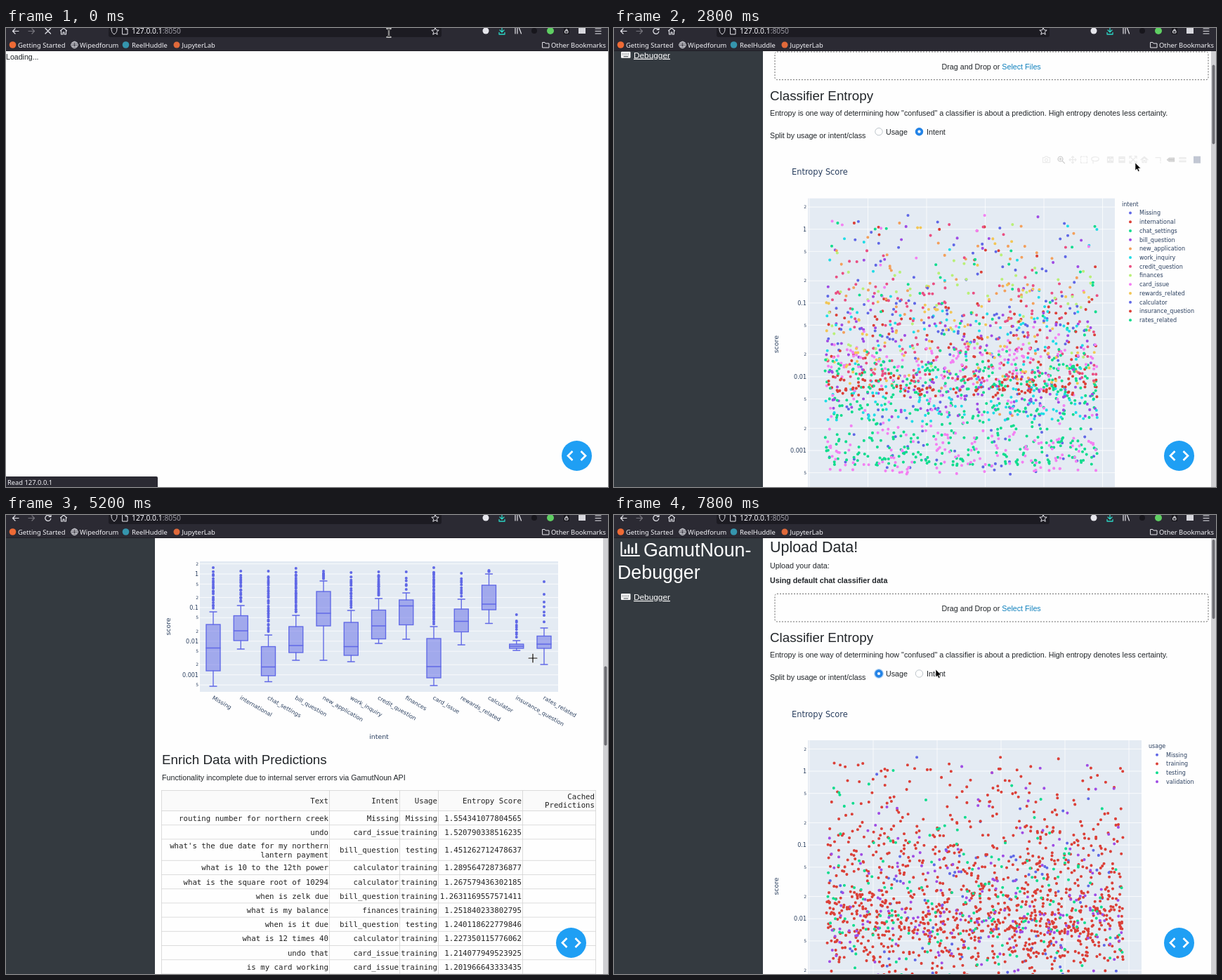
These frames come from a looping animation (857 px wide and 654 px high, 8 s). An HTML page:

```html
<!DOCTYPE html>
<html lang="en">
<head>
<meta charset="utf-8">
<title>Entropy dashboard</title>
<style>
html, body { margin: 0; width: 100%; height: 100%; overflow: hidden; background: #fefefe; }
svg { display: block; width: 857px; height: 654px; }
text { white-space: pre; }
.a { font-family: "Liberation Sans", Arial, sans-serif; fill: #212529; }
.d { font-family: "DejaVu Sans", Verdana, sans-serif; fill: #2a3f5f; }
.m { font-family: "DejaVu Sans Mono", monospace; fill: #222; }
.n { font-family: "Noto Sans", sans-serif; fill: #f4f4f8; }
.line { fill: none; stroke-linecap: round; stroke-linejoin: round; }
</style>
</head>
<body>
<svg id="stage" viewBox="0 0 857 654"></svg>
<script>
const LOOP = 8000, BODY = 10.73, TICK = 8.05;

// name, points, box outliers, then box heights: top outlier, whisker, q3, median, q1, whisker
const classes = [
  ["Missing", 115, 20, 175, 238, 256, 289.5, 322, 344],
  ["international", 110, 16, 180, 229, 243.5, 265, 279, 291],
  ["chat_settings", 400, 30, 180, 271, 287.5, 316.5, 329, 337.5],
  ["bill_question", 180, 24, 176, 243, 259, 286, 296, 307],
  ["new_application", 65, 7, 180, 194, 209, 240, 258, 307],
  ["work_inquiry", 170, 16, 182, 236, 253, 287.5, 300, 309],
  ["credit_question", 190, 17, 181, 219, 235.5, 258, 276.5, 283],
  ["finances", 60, 6, 181, 211, 221, 229.5, 256.5, 277],
  ["card_issue", 290, 32, 175, 259, 276, 316, 332, 343],
  ["rewards_related", 85, 10, 183, 220, 234, 251.5, 266.5, 285],
  ["calculator", 45, 3, 179, 184, 200, 227, 235, 254.5],
  ["insurance_question", 115, 9, 242, 279, 284, 287, 290, 293],
  ["rates_related", 90, 7, 195, 261, 272.5, 284, 290, 313]
];
const palette = ["#6068e6", "#db4038", "#10dc8e", "#9f4ce4", "#f3a05c",
  "#20dce6", "#ea4f82", "#b9f078", "#f380f2", "#f2c656"];
const usages = ["Missing", "training", "testing", "validation"];

let seed = 71;
const rnd = () => (seed = (seed * 48271) % 2147483647) / 2147483647;

const text = (x, y, s, size = BODY, cls = "a", extra = "") =>
  `<text x="${x}" y="${y}" font-size="${size}" class="${cls}" ${extra}>${s}</text>`;
const rect = (x, y, w, h, fill, extra = "") =>
  `<rect x="${x}" y="${y}" width="${w}" height="${h}" fill="${fill}" ${extra}/>`;
const dot = (x, y, r, fill, extra = "") =>
  `<circle cx="${x}" cy="${y}" r="${r}" fill="${fill}" ${extra}/>`;
const line = (d, color, w = 1, extra = "") =>
  `<path class="line" d="${d}" stroke="${color}" stroke-width="${w}" ${extra}/>`;
const group = (id, body) => `<g id="${id}">${body}</g>`;
const mid = 'text-anchor="middle"', end = 'text-anchor="end"';

function logAxis(one, decade, x, y, w, h) {
  let s = rect(x, y, w, h, "#e4ebf3");
  for (let e = 0; e < 5; e++) for (const m of [1, 2, 5]) {
    const ty = one + decade * (e - Math.log10(m));
    if (ty < y || ty > y + h) continue;
    const size = m === 1 ? TICK : 6;
    s += line(`M${x} ${ty}h${w}`, "#fff", 0.75) +
      text(274, ty + size * 0.36, m === 1 ? [1, 0.1, 0.01, 0.001][e] : m, size, "d", end);
  }
  return s;
}

const turned = (y) => text(0, 0, "score", 9.39, "d", `${mid} transform="translate(234 ${y}) rotate(-90)"`);

// Every point follows the quartiles of its class.
const points = classes.flatMap(([, n, , top, ...q], kind) => Array.from({ length: n }, (_, i) => {
  const u = rnd() * 4, k = Math.floor(u);
  const tail = rnd() < 0.08;
  const y = i === 0 ? top : tail ? q[0] - (q[0] - top) * rnd() : q[k] + (q[k + 1] - q[k]) * (u - k);
  const r = rnd();
  const use = kind === 0 ? 0 : r < 0.74 ? 1 : r < 0.87 ? 2 : 3;
  return { x: rnd(), y: 365 + (y - 184) * 2.194, kind, use };
}));

function scatter(id, names, key, width, step) {
  let s = logAxis(365, 105.1, 276, 321, width, 416);
  for (let i = 0; i < 6; i++) {
    const x = 278 + i * step;
    s += line(`M${x} 321v416`, "#fff", 0.75) + text(x, 746, 601 + i / 2 + "k", TICK, "d", mid);
  }
  const left = 276 + width;
  s += text(276 + width / 2, 765, "id", 9.39, "d", mid) + text(left + 10, 332, key, TICK, "d");
  names.forEach((name, i) => {
    const color = palette[i % 10], y = 341.8 + i * 12.72;
    const d = points.filter(p => (key === "usage" ? p.use : p.kind) === i)
      .map(p => `M${(278 + (0.27 + p.x * 4.64) * step).toFixed(1)} ${p.y.toFixed(1)}h.01`).join("");
    s += line(d, color, 4.1) + dot(left + 22, y, 2, color) + text(left + 35, y + 2.9, name, TICK, "d");
  });
  return group(id, s);
}

function boxPlot() {
  const c = palette[0];
  let s = logAxis(184, 47.9, 276, 166, 510, 186);
  classes.forEach(([name, , n, top, high, q3, med, q1, low], i) => {
    const x = 295 + i * 39.25;
    s += line(`M${x} ${high}V${q3}M${x} ${q1}V${low}M${x - 5} ${high}h10M${x - 5} ${low}h10`, c, 1.35) +
      rect(x - 10, q3, 20, q1 - q3, c, `fill-opacity=".5" stroke="${c}" stroke-width="1.35"`) +
      line(`M${x - 10} ${med}h20`, c, 1.35);
    for (let k = 0; k < n; k++) {
      const f = k ? Math.min(1, (k + 1 + rnd() * 0.8) / (n + 1)) : 0;
      s += dot(x, top + (high - 3 - top) * f, 2, c);
    }
    s += text(0, 0, name, TICK, "d", `transform="translate(${x - 2} 362) rotate(30)"`);
  });
  return s + turned(259) + text(531, 419, "intent", 9.39, "d", mid);
}

function table() {
  const cols = [221.5, 460.5, 560.5, 615.5, 735.5, 839.5];
  const rows = [
    ["routing number for northern creek", "Missing", "Missing", "1.554341077804565"],
    ["undo", "card_issue", "training", "1.520790338516235"],
    ["what's the due date for my northern|lantern payment", "bill_question", "testing", "1.451262712478637"],
    ["what is 10 to the 12th power", "calculator", "training", "1.289564728736877"],
    ["what is the square root of 10294", "calculator", "training", "1.267579436302185"],
    ["when is zelk due", "bill_question", "training", "1.2631169557571411"],
    ["what is my balance", "finances", "training", "1.251840233802795"],
    ["when is it due", "bill_question", "testing", "1.240118622779846"],
    ["what is 12 times 40", "calculator", "training", "1.227350115776062"],
    ["undo that", "card_issue", "training", "1.214077949523925"],
    ["is my card working", "card_issue", "training", "1.201966643333435"]
  ];
  let y = 492.5, lines = "", s = rect(221.5, y, 618, 29, "#fafafa");
  const addRow = (cells, h) => {
    cells.forEach((cell, i) => cell.split("|").forEach((part, k, all) => {
      s += text(cols[i + 1] - 1.5, y + h / 2 + 4 + (k - (all.length - 1) / 2) * 12.9, part, BODY, "m", end);
    }));
    lines += `M221.5 ${y}h618`;
    y += h;
  };
  addRow(["Text", "Intent", "Usage", "Entropy Score", "Cached|Predictions"], 29);
  rows.forEach(r => addRow(r, r[0].includes("|") ? 30.4 : 20.2));
  cols.forEach(x => lines += `M${x} 492.5V${y}`);
  return s + line(lines + `M221.5 ${y}h618`, "#d3d3d3", 0.8);
}

const glyphs = {
  camera: "M-5-3h2.5l1-1.5h3l1 1.5h2.5v7h-10zM0-1.5a2 2 0 1 0 .01 0z",
  zoom: "M-1-4.5a3.5 3.5 0 1 0 .01 0zM2 2l3 3M-2.5-1h3M-1-2.5v3",
  pan: "M-5 0h10M0-5v10M-1.5-3.5l1.5-1.5 1.5 1.5M-1.5 3.5l1.5 1.5 1.5-1.5M-3.5-1.5l-1.5 1.5 1.5 1.5M3.5-1.5l1.5 1.5-1.5 1.5",
  select: "M-4.5-4.5h2m2 0h1m2 0h2v2m0 2v1m0 2v2h-2m-2 0h-1m-2 0h-2v-2m0-2v-1m0-2v-2",
  lasso: "M0-4c7 0 7 6 0 6s-7-6 0-6M-3 1c-1 2 1 2 0 4",
  plus: "M-4-4h8v8h-8zM-3-2h6M-3 2h6M-3-3h2v6h-2M3-3h-2v6h2",
  minus: "M-4-4h8v8h-8zM-3-2.5h6M-3 2.5h6M-3-1.7h6M-3 1.7h6",
  auto: "M-4-4l8 8M-4 4l8-8M-5-2v-3h3M2-5h3v3M5 2v3h-3M-2 5h-3v-3",
  home: "M-5 0l5-4.5 5 4.5M-3 0v4h2v-3h2v3h2v-4l-3-3z",
  spike: "M-4-3h6M3-3v5M3 4v.5",
  near: "M-5 0l3-2.5h7v5h-7zM-3 0h7M-2-1h6M-2 1h6",
  compare: "M-4-3h9v1.5h-9zM-4 1.5h9v1.5h-9z"
};

function modebar(id, y, isBox) {
  const names = Object.keys(glyphs).filter(n => !isBox || (n !== "select" && n !== "lasso"));
  const xs = isBox ? [647.5, 669, 685] : [615.5, 636.5, 653, 669, 685];
  xs.push(706.5, 723, 739, 755, 775, 792.5, 809);
  const icons = names.map((n, i) => line(glyphs[n], n === "zoom" || n === "near" ? "#777" : "#c8c8c8", 1.3,
    `transform="translate(${xs[i]} ${y})"`));
  return group(id, icons.join("") + rect(825, y - 5, 10, 10, "#4c5c80"));
}

function radio(id, x) {
  return dot(x, 226, 5.2, "#fff", 'stroke="#adb5bd" stroke-width=".8"') +
    group(id, dot(x, 226, 5.7, "#2384e8") + dot(x, 226, 2.1, "#fff"));
}

function toolbar() {
  const w = "#e6e6ec";
  return rect(0, 0, 857, 33, "#2b2a33") + rect(0, 32, 857, 1, "#201f27") +
    rect(146, -10, 474, 23, "#1c1b22", 'rx="3"') +
    line("M18 4.5h-8M13 1l-3.5 3.5 3.5 3.5", w, 1.2) +
    line("M32 4.5h8M37 1l3.5 3.5-3.5 3.5", "#77767e", 1.2) +
    group("stop", line("M56 .5l7.5 7.5M63.5 .5l-7.5 7.5", w, 1.2)) +
    group("reload", line("M63 2a4 4 0 1 0 .8 3M64-.5v3h-3", w, 1.2)) +
    line("M77.5 4l4.5-4 4.5 4M78.5 4v5h2.5v-3h2v3h2.5v-5", w, 1.1) +
    line("M150 0c2 0 3-1 4-1s2 1 4 1c0 5-1 7-4 9-3-2-4-4-4-9z", w) +
    line("M166-1h4l3 3v7h-7zM170-1v3h3", w) +
    text(179, 8, '127.0.0.1<tspan fill="#9b9aa3">:8050</tspan>', 10.3, "n") +
    line("M611-.5l1.5 3.4 3.7.3-2.9 2.4.9 3.7-3.2-2-3.2 2 .9-3.7-2.9-2.4 3.7-.3z", w) +
    dot(683, 4, 4.5, w) +
    line("M706-1v7M703 3l3 3 3-3M702 6.5v2.5h8v-2.5", "#2bd5c4", 1.3) +
    line("M725 0v8M728 0v8M730.5 0l3 8", w, 1.2) +
    dot(752, 4, 4, "#17161c") + dot(775, 4, 5, "#5fcf63") + rect(794, 0, 8, 9, "#17161c") +
    line("M796 4h4v3h-4zM797 4v-2h2v2", w) + rect(815, 0, 10, 8, "#d8d8de") +
    line("M839 1h8M839 4.5h8M839 8h8", w, 1.1) +
    dot(9.5, 24, 4.8, "#ee6a35") + text(17, 27.5, "Getting Started", 9.4, "n") +
    line("M97.5 19.3a4.7 4.7 0 1 0 .01 0c-3.3 3-3.3 6.4 0 9.4c3.3-3 3.3-6.4 0-9.4M93 24h9M94 21.5h7M94 26.5h7", w, 0.9) +
    text(105, 27.5, "Wipedforum", 9.4, "n") +
    dot(170.5, 24, 4.8, "#3595ad") + text(179, 27.5, "ReelHuddle", 9.4, "n") +
    dot(243, 24, 4.5, "#e0693a") + text(250.5, 27.5, "JupyterLab", 9.4, "n") +
    line("M764 20.5h3l1 1.5h5v6h-9z", w) + text(776, 27.5, "Other Bookmarks", 9.4, "n");
}

const white = 'style="fill:#fff"';
const sideText =
  line("M10.5 39v19h25.5", "#fff", 2) + line("M16 54v-4M21 54v-11M26 54v-7M31.5 54v-13", "#fff", 2.6) +
  text(42, 58.5, "GamutNoun-", 26.8, "a", white) + text(5, 90.5, "Debugger", 26.8, "a", white) +
  rect(10, 112, 13.5, 9, "#fff", 'rx="1"') +
  line("M12 114.5h10M12 116.5h10", "#343a40", 1, 'stroke-dasharray=".1 2"') + line("M14 119h6", "#343a40") +
  text(28, 121, "Debugger", 11.84, "a", white + ' text-decoration="underline"');

const lower =
  rect(229, 112.3, 617, 39.7, "none", 'rx="3" stroke="#555" stroke-width=".9" stroke-dasharray="2 2"') +
  text(466.5, 137, 'Drag and Drop or <tspan fill="#0f80bd">Select Files</tspan>') +
  text(222, 181, "Classifier Entropy", 18.77) +
  text(222, 203, 'Entropy is one way of determining how "confused" a classifier is about a prediction. High entropy denotes less certainty.') +
  text(222, 235, "Split by usage or intent/class") +
  group("focus", dot(377, 226, 7, "#b5d6f7")) + radio("pickUsage", 377) + radio("pickIntent", 434.5) +
  text(387, 230, "Usage") + text(445, 230, "Intent");

const plots = text(253, 287.5, "Entropy Score", 11.4, "d") + turned(529) +
  scatter("byIntent", classes.map(c => c[0]), "intent", 437, 83.5) +
  scatter("byUsage", usages, "usage", 475, 91) +
  modebar("scatterBar", 266, false) + modebar("boxBar", 842, true) +
  `<g transform="translate(0 704)">` +
  text(222, 115, "Entropy Quantiles Per Class or Usage", 18.77) + boxPlot() +
  text(222, 455, "Enrich Data with Predictions", 18.77) +
  text(222, 477.5, "Functionality incomplete due to internal server errors via GamutNoun API") + table() + "</g>";

const pointers = {
  beam: line("M-2.5-6q2.5 0 2.5 2v8q0 2-2.5 2M2.5-6q-2.5 0-2.5 2M0 4q0 2 2.5 2", "#fff", 2.2) +
    line("M-2-6q2 0 2 2v8q0 2-2 2M2-6q-2 0-2 2M0 4q0 2 2 2", "#111"),
  arrow: `<path d="M0 0v11l2.5-2.2 1.7 3.8 1.9-.8-1.7-3.8h3.4z" fill="#000" stroke="#fff" stroke-width=".6"/>`,
  hand: `<path d="M-.8 0q1-.8 1.7.2l.2 3.8 4.1.8q1.3.4 1.2 1.7l-.6 5.5h-5.5l-3.800-5q0-1.400 1.300-1l1.600 1.200z" fill="#000" stroke="#fff" stroke-width=".6"/>`,
  cross: line("M-6 0h12M0-6v12", "#fff", 2.6) + line("M-6 0h12M0-6v12", "#000", 1.2)
};

const stage = document.getElementById("stage");
stage.innerHTML = rect(0, 0, 857, 654, "#fefefe") +
  group("loading", text(0, 45, "Loading...", 10.6)) +
  group("layout", rect(0, 33, 212, 621, "#343a40") + group("page", sideText +
    text(222, 53, "Upload Data!", 21.46) + text(222, 76, "Upload your data:") +
    group("fileNote", text(222, 97, "Using default chat classifier data", BODY, "a", 'font-weight="bold"')) +
    group("lower", lower) + group("plots", plots))) +
  group("bar", rect(850, 33, 7, 621, "#cfcfd2") + rect(851.5, 35, 4, 113, "#6e6e73", 'id="thumb" rx="2"')) +
  group("code", dot(0, 0, 21.5, "#1f9ff4") + line("M-6-6.5l-6.5 6.5 6.5 6.5M6-6.5l6.5 6.5-6.5 6.5", "#fff", 2.7,
    'style="stroke-linecap:butt;stroke-linejoin:miter"')) +
  group("status", rect(-3, 639, 219, 18, "#2b2a33", 'rx="2"') + text(2, 650.5, "Read 127.0.0.1", 9.35, "n")) +
  toolbar() + group("cursor", Object.entries(pointers).map(([id, s]) => group(id, s)).join(""));

const el = {};
stage.querySelectorAll("[id]").forEach(n => el[n.id] = n);
const show = (id, on) => { el[id].style.display = on ? "" : "none"; };
const move = (id, x, y) => el[id].setAttribute("transform", `translate(${x} ${y})`);

// Eased value between [time, ...values] keys.
function track(keys, t) {
  let i = 0;
  while (i < keys.length - 1 && keys[i + 1][0] <= t) i++;
  const a = keys[i], b = keys[i + 1] || a;
  const f = b === a ? 0 : (t - a[0]) / (b[0] - a[0]), k = f * f * (3 - 2 * f);
  return a.slice(1).map((v, j) => v + (b[j + 1] - v) * k);
}
const scrollKeys = [[0, 0], [2600, 0], [3200, 302], [3800, 302], [4100, 604], [4300, 604], [4500, 704],
  [4600, 704], [4900, 804], [5200, 804], [5600, 503], [5800, 503], [6450, 0]];
const cursorKeys = [[0, 545, 7], [600, 545, 7], [900, 790, 18], [1000, 790, 18], [1200, 540, 126],
  [1500, 540, 126], [2200, 740, 191], [2500, 742, 192], [3400, 742, 192], [3500, 742, 198], [4100, 742, 198],
  [4400, 750, 204], [5300, 750, 204], [5700, 775, 361], [6100, 775, 361], [6500, 743, 351],
  [7000, 420, 236], [7200, 377, 224], [7400, 377, 224], [7800, 458, 220]];
const fade = (t, from, to) => t < from || t >= to ? 0 : Math.min(1, (t - from) / 300);

function draw(t) {
  const [scroll] = track(scrollKeys, t), ready = t >= 1400, overflow = t >= 700;
  const built = t >= 200, clicked = t >= 7300, usage = t >= 7500;
  show("loading", !built);
  show("layout", built);
  show("status", t < 400);
  show("stop", !overflow);
  show("reload", overflow);
  show("bar", overflow);
  show("fileNote", ready);
  show("plots", ready);
  show("byIntent", !usage);
  show("byUsage", usage);
  show("pickIntent", !clicked);
  show("pickUsage", clicked);
  show("focus", clicked);
  move("page", 0, -scroll);
  move("lower", 0, ready ? 0 : -16);
  move("code", overflow ? 804.5 : 812.5, 609.5);
  move("thumb", 0, scroll * 0.2245);
  el.scatterBar.style.opacity = Math.max(fade(t, 2700, 3700), fade(t, 6100, 6900));
  el.boxBar.style.opacity = fade(t, 5500, 6100);
  move("cursor", ...track(cursorKeys, t));
  const pointer = t < 700 ? "beam" : t >= 3500 && t < 3900 ? "hand" : t >= 4400 && t < 5400 ? "cross" : "arrow";
  Object.keys(pointers).forEach(p => show(p, p === pointer));
}

const start = performance.now();
function tick() {
  const t = (performance.now() - start) % LOOP;
  draw(Math.floor(t / 100) * 100);
  requestAnimationFrame(tick);
}
tick();
</script>
</body>
</html>
```
